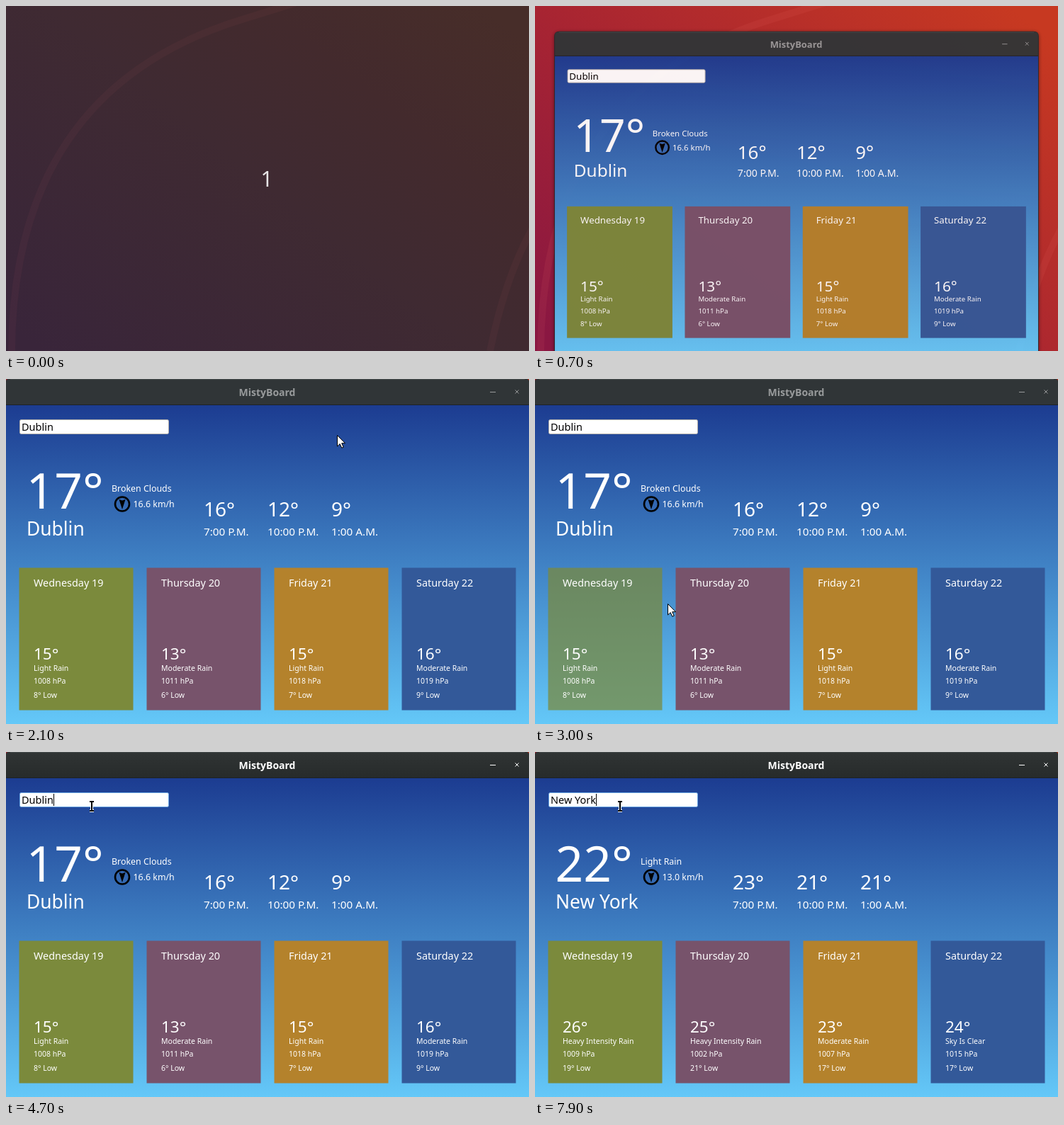
An HTML page for the animation above (8 s loop, 738 by 487 pixels).

```html
<!DOCTYPE html>
<html lang="en">
<head>
<meta charset="utf-8">
<title>Weather window</title>
<style>
html, body { margin: 0; width: 100%; height: 100%; overflow: hidden; background: #3f2a32; }
svg { display: block; width: 100vw; height: 100vh; }
text { font-family: "Noto Sans", "Open Sans", sans-serif; fill: #fff; white-space: pre; }
#frame { filter: drop-shadow(0 1px 3px rgba(0, 0, 0, .45)); }
</style>
</head>
<body>
<svg viewBox="0 0 738 487">
  <defs>
    <linearGradient id="desk" gradientUnits="userSpaceOnUse" x1="140" y1="560" x2="620" y2="-40">
      <stop offset="0" stop-color="#8a1742"/>
      <stop offset=".45" stop-color="#a72432"/>
      <stop offset="1" stop-color="#c73921"/>
    </linearGradient>
    <linearGradient id="dim" gradientUnits="userSpaceOnUse" x1="140" y1="560" x2="620" y2="-40">
      <stop offset="0" stop-color="#39253a"/>
      <stop offset=".5" stop-color="#3f2a32"/>
      <stop offset=".75" stop-color="#432a2d"/>
      <stop offset="1" stop-color="#472d29"/>
    </linearGradient>
    <linearGradient id="sky" gradientUnits="userSpaceOnUse" x1="0" y1="37" x2="0" y2="487">
      <stop offset="0" stop-color="#1c3c91"/>
      <stop offset="1" stop-color="#64c8f8"/>
    </linearGradient>
    <linearGradient id="bar" x2="0" y2="1">
      <stop offset="0" stop-color="#303434"/>
      <stop offset="1" stop-color="#272b2b"/>
    </linearGradient>
  </defs>

  <rect id="wall" width="738" height="487"/>
  <g id="arcs" fill="none" stroke="#ff7a70" stroke-width="10">
    <path d="M8 487Q10 120 330 20L420 -8"/>
    <path d="M683 487Q705 380 745 310"/>
  </g>
  <text id="count" x="368" y="254.500" font-size="30" text-anchor="middle" fill-opacity=".88">1</text>

  <g id="win">
    <path id="frame" d="M-1 600V7Q-1 -1 7 -1H731Q739 -1 739 7V600Z" fill="#26282b"/>
    <path id="titlebar" d="M0 37V5Q0 0 5 0H733Q738 0 738 5V37Z"/>
    <path d="M6 .5H732" stroke="#444a4b"/>
    <rect y="37" width="738" height="563" fill="url(#sky)"/>
    <path d="M0 36.500H738" stroke="#1d2226"/>
    <g id="caption">
      <text x="368.500" y="24" font-size="14" font-weight="700" text-anchor="middle">MistyBoard</text>
      <path d="M683 18.500H691M718.500 15.500L723.500 20.500M723.500 15.500L718.500 20.500" stroke="#fff"/>
    </g>
    <rect id="field" x="19.500" y="57.500" width="210" height="20" fill="#fff" rx="2"/>
    <rect id="selection" x="22" y="59" width="45" height="17" fill="#308cc6"/>
    <text id="entry" x="22" y="73" font-size="14.500"/>
    <path id="caret" stroke="#000" d="M.5 59V76"/>
    <circle cx="164" cy="176.500" r="10" fill="none" stroke="#000" stroke-width="2.600"/>
    <path d="M159.500 170L164 171.500L168.500 170L164 184Z"/>
    <g id="cards"></g>
    <g id="labels"></g>
  </g>

  <path id="arrow" d="M.5 .5V16L4.200 12.600L6.800 18.300L9.200 17.200L6.700 11.700H11.500Z" fill="#fff" stroke="#000"/>
  <g id="beam" fill="none">
    <path d="M-3 -6H3M-3 7H3M0 -6V7" stroke="#fff" stroke-width="4"/>
    <path d="M-3 -6H3M-3 7H3M0 -6V7" stroke="#000" stroke-width="2"/>
  </g>
</svg>
<script>
const LOOP = 8000;
const $ = id => document.getElementById(id);
const set = (el, attrs) => { for (const k in attrs) el.setAttribute(k, attrs[k]); };
const show = (id, on) => { $(id).style.display = on ? "" : "none"; };

function add(parent, tag, attrs) {
  const el = document.createElementNS("http://www.w3.org/2000/svg", tag);
  set(el, attrs);
  return $(parent).appendChild(el);
}

const days = ["Wednesday 19", "Thursday 20", "Friday 21", "Saturday 22"];
const colors = ["#7b8a3c", "#77536b", "#b4822c", "#335999"];
const hours = ["7:00 P.M.", "10:00 P.M.", "1:00 A.M."];

const reports = [
  { now: ["17°", "Dublin", "Broken Clouds", "16.6 km/h"], next: ["16°", "12°", "9°"],
    days: [["15°", "Light Rain", "1008 hPa", "8° Low"], ["13°", "Moderate Rain", "1011 hPa", "6° Low"],
           ["15°", "Light Rain", "1018 hPa", "7° Low"], ["16°", "Moderate Rain", "1019 hPa", "9° Low"]] },
  { now: ["22°", "New York", "Light Rain", "13.0 km/h"], next: ["23°", "21°", "21°"],
    days: [["26°", "Heavy Intensity Rain", "1009 hPa", "19° Low"], ["25°", "Heavy Intensity Rain", "1002 hPa", "21° Low"],
           ["23°", "Moderate Rain", "1007 hPa", "17° Low"], ["24°", "Sky Is Clear", "1015 hPa", "17° Low"]] }
];

// Each label keeps its wording for both reports.
const labels = [];
function label(x, y, size, read) {
  const el = add("labels", "text", { x, y, "font-size": size });
  labels.push({ el, words: reports.map(read) });
}

[[28.5, 183, 69.5], [29, 221, 26.4], [149, 159, 12.4], [179.5, 181, 12.4]]
  .forEach(([x, y, size], i) => label(x, y, size, r => r.now[i]));
hours.forEach((hour, i) => {
  label(279 + 90 * i, 194, 28, r => r.next[i]);
  label(279 + 90 * i, 221, 15.3, () => hour);
});
const cards = days.map((day, i) => {
  const x = 39 + 180 * i;
  label(x, 293, 14.4, () => day);
  [[396, 22.5], [412, 10.5], [430, 10.5], [450, 10.5]]
    .forEach(([y, size], row) => label(x, y, size, r => r.days[i][row]));
  return add("cards", "rect", { x: x - 20.5, y: 266.5, width: 161, height: 201, fill: colors[i] });
});

// Rows of [time, values...]: linear between rows, held outside them.
function tween(rows, t) {
  if (t <= rows[0][0]) return rows[0].slice(1);
  const i = rows.findIndex(row => row[0] > t);
  if (i < 0) return rows[rows.length - 1].slice(1);
  const a = rows[i - 1], b = rows[i], p = (t - a[0]) / (b[0] - a[0]);
  return a.slice(1).map((v, k) => v + (b[k + 1] - v) * p);
}
const latest = (rows, t) => rows.reduce((found, row) => row[0] <= t ? row[1] : found, rows[0][1]);

const pointer = [[2100, 467, 79], [2300, 405, 48], [2500, 285, 165], [2700, 150, 375], [2800, 113, 449],
  [2900, 113, 449], [3000, 187, 317], [3100, 187, 317], [3300, 187, 251], [3400, 187, 251],
  [3600, 160, 295], [3800, 133, 282], [4300, 131, 137], [4400, 127, 100]];
const hover = [[2500, 0], [2700, 1], [3100, 1], [3300, 0], [3400, 0], [3700, 1], [3900, 1], [4200, 0]];
const opening = [[700, .924, .95], [800, .982, .985], [900, 1, 1]];
const typing = [[0, "Dublin"], [6000, ""], [6400, "N"], [6700, "Ne"], [6800, "New"], [6900, "New "],
  [7200, "New Y"], [7400, "New Yo"], [7500, "New Yor"], [7600, "New York"]];

function draw(time) {
  const t = Math.floor(time / 100) * 100;
  const counting = t < 100, focused = t >= 4700, selected = t === 5900;

  set($("wall"), { fill: counting ? "url(#dim)" : "url(#desk)" });
  set($("arcs"), { opacity: counting ? .045 : .08 });
  show("count", counting);

  const [scale, alpha] = tween(opening, t);
  show("win", t >= 700);
  set($("win"), { opacity: alpha, transform: `translate(369 482) scale(${scale}) translate(-369 -482)` });
  set($("titlebar"), { fill: focused ? "url(#bar)" : "#303537" });
  set($("caption"), { opacity: focused ? 1 : .5 });

  set($("field"), { stroke: focused ? "#6ba6e2" : "#b3afab" });
  const entry = $("entry");
  entry.textContent = latest(typing, t);
  entry.style.fill = selected ? "#fff" : "#000";
  show("selection", selected);
  show("caret", focused && t !== 5200 && !selected);
  const end = entry.textContent && t >= 700 ? entry.getComputedTextLength() : 0;
  set($("caret"), { transform: `translate(${Math.round(22 + end)} 0)` });

  const report = t >= 7900 ? 1 : 0;
  for (const { el, words } of labels) el.textContent = words[report];
  set(cards[0], { opacity: 1 - .27 * tween(hover, t)[0] });

  const [x, y] = tween(pointer, t).map(Math.round);
  show("arrow", t >= 2100 && t < 4500);
  set($("arrow"), { transform: `translate(${x} ${y})` });
  show("beam", t >= 4500);
  set($("beam"), { transform: `translate(${t < 5300 ? 121 : 120} 76)` });
}

const start = performance.now();
function tick() {
  draw((performance.now() - start) % LOOP);
  requestAnimationFrame(tick);
}
tick();
</script>
</body>
</html>
```
